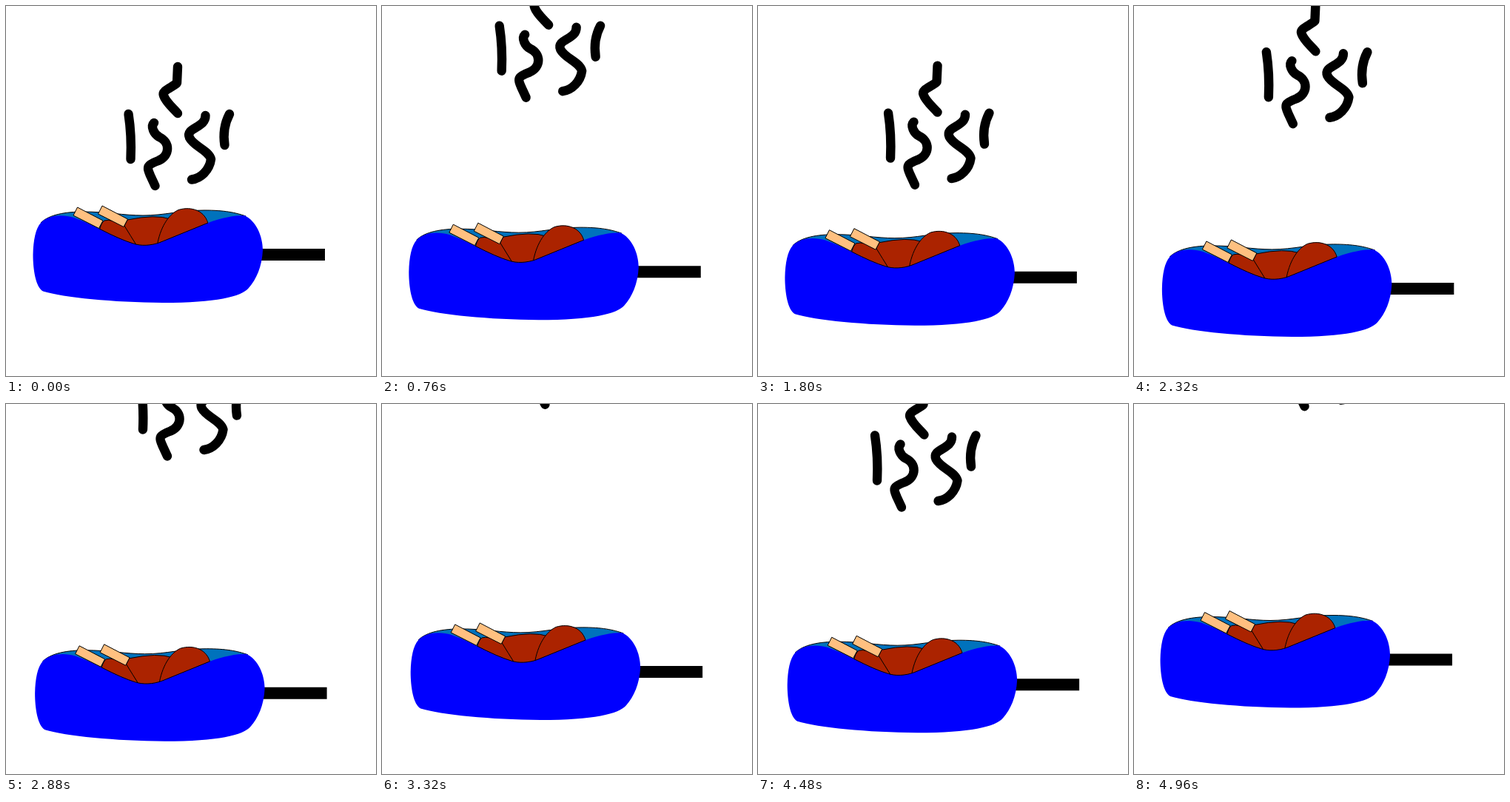
An HTML page for the animation above (5 s loop, 500 by 500 pixels).

```html
<!DOCTYPE html>
<html lang="en">
<head>
<meta charset="utf-8">
<title>Steaming pan</title>
<style>
  html, body { margin: 0; width: 100%; height: 100%; overflow: hidden; background: #fff; }
  svg { display: block; width: 100vw; height: 100vh; }
  .line { stroke: #000; stroke-linejoin: round; }
  .steam { fill: none; stroke: #000; stroke-width: 12.4; stroke-linecap: round; stroke-linejoin: round; }
</style>
</head>
<body>
<svg viewBox="0 0 500 500">
  <g id="pan">
    <path d="M344 328 H431 V344 H344 Z"/>
    <path class="line" fill="#0072bc" d="M47 293 C58 282 80 278 105 278 C135 278 160 283 185 283 C215 283 235 276 268 276 C295 276 310 279 324 284 L273 310 L188 330 L100 300 Z"/>
    <g class="line" fill="#ab2300">
      <path d="M126 305 Q128 293 133 290 Q143 287 162 298 L178 326 Z"/>
      <path d="M160 297 L164 289 Q203 281 222 288 L212 326 H178 Q168 310 160 297 Z"/>
      <path d="M204 325 C208 300 219 282 233 275.500 C251 270 270 277 273.500 296 Z"/>
    </g>
    <path fill="#00f" d="M47 293 C57 283 74 281 92 286 C115 294 150 314 172 321 C182 324.500 196 324 208 319.500 L273 293 C292 286 308 283 322 283 C338 290 347 311 347 330 C346 352 338 370 328 381 C318 393 284 401 212 401 C145 400.500 78 394 50 385.500 C40 380 36.500 356 36.500 336 C37 316 40 301 47 293 Z"/>
    <path class="line" fill="none" d="M126 301 Q155 316 172 321 C182 324.500 196 324 208 319.500 L273 293"/>
    <g class="line" fill="#ffc080">
      <path id="bone" d="M96.500 272 L131 290 L125.500 300.500 L91 283 Z"/>
      <use href="#bone" x="33.500" y="-2"/>
    </g>
  </g>
  <g id="steam" class="steam">
    <path d="M165.500 146 Q170 175 168.500 207"/>
    <path d="M200 158 C195 163 200 173 207 177 C222 184 222 202 206 209 C190 215 190 217 195 229 L201.500 243"/>
    <path d="M269.500 148 C270 165 242 164 248 178 C254 190 274 195 277 207 C275 222 263 233 251 234.500"/>
    <path d="M302 146 Q292 165 295.500 188"/>
    <path d="M232 82 L231 104 C225 110 210 114 213 121 C216 130 225 137 232 145"/>
  </g>
</svg>
<script>
  const LOOP = 5000, STEP = 40;
  const pan = document.getElementById('pan');
  const steam = document.getElementById('steam');

  // The pan is tossed in straight moves between these turning points.
  const turns = [
    { t: 0, x: 0, y: 0 },
    { t: 600, x: 1, y: 31 },
    { t: 1130, x: -3, y: 5 },
    { t: 1760, x: -0.2, y: 29.5 },
    { t: 2800, x: 2.7, y: 60 },
    { t: 3760, x: 1.7, y: -3 },
    { t: 4440, x: 3.5, y: 46 },
    { t: LOOP, x: -1.3, y: 6.7 }
  ];

  // Steam drifts at a steady speed (px/s); the last entry is a sideways gust.
  const drifts = [
    { t: 0, x: 0, y: 0, vx: -9, vy: -157 },
    { t: 1760, x: 10.3, y: 5, vx: 5.5, vy: -158.5 },
    { t: 3720, x: -9, y: 10.5, vx: 2, vy: -150 },
    { t: 4480, x: -7.5, y: -103.5, vx: 76, vy: -284 }
  ];

  const current = (list, t) => list.findLastIndex(p => p.t <= t);

  function move(el, x, y) {
    el.setAttribute('transform', `translate(${x.toFixed(2)} ${y.toFixed(2)})`);
  }

  function draw(ms) {
    const t = Math.floor((ms % LOOP) / STEP) * STEP;

    const i = current(turns, t), a = turns[i], b = turns[i + 1];
    const k = (t - a.t) / (b.t - a.t);
    move(pan, a.x + (b.x - a.x) * k, a.y + (b.y - a.y) * k);

    const d = drifts[current(drifts, t)], s = (t - d.t) / 1000;
    move(steam, d.x + d.vx * s, d.y + d.vy * s);
  }

  const start = performance.now();
  function tick() {
    draw(performance.now() - start);
    requestAnimationFrame(tick);
  }
  tick();
</script>
</body>
</html>
```
